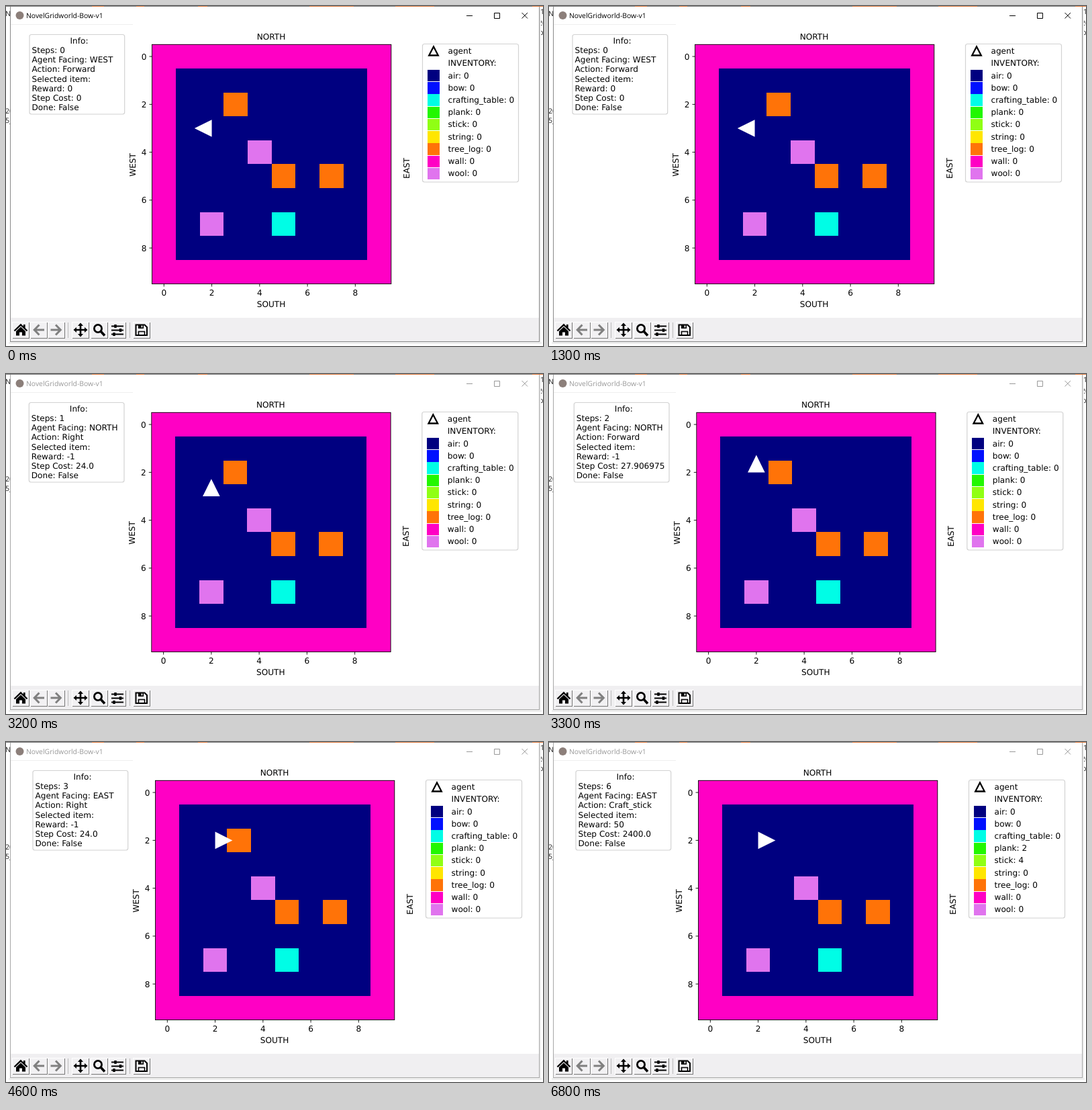
These frames come from a looping animation (800 by 506 pixels, 8 s). An HTML page:

```html
<!DOCTYPE html>
<html lang="en">
<head>
<meta charset="utf-8">
<title>NovelGridworld-Bow-v1</title>
<style>
  html, body { margin: 0; width: 100%; height: 100%; overflow: hidden; background: #fff; }
  svg { display: block; width: 800px; height: 506px; }
  text { font: 12.1px "DejaVu Sans", sans-serif; text-rendering: geometricPrecision; white-space: pre; }
  .mid { text-anchor: middle; }
  .end { text-anchor: end; }
  .title { font: 10.4px "Open Sans", sans-serif; }
  .behind text { font: 10.5px "Open Sans", sans-serif; fill: #222; }
  .crisp { shape-rendering: crispEdges; }
  .frame { fill: none; stroke: #8a8a8a; }
  .chrome { color: #000; }
  .blur .chrome { color: #999; }
  .blur .frame { stroke: #a8a8a8; }
  .box { fill: #fff; stroke: #d2d2d2; stroke-width: 1.2; }
</style>
</head>
<body>
<svg id="stage" viewBox="0 0 800 506">
  <rect width="800" height="506" fill="#fff"/>
  <g class="behind">
    <text x="-1" y="15">N</text><text x="-1" y="160">20</text><text x="-1" y="174">5_</text>
    <text x="796" y="12">1</text><text x="793" y="29">20</text><text x="794" y="43">p</text>
  </g>
  <rect x="4" y="500" width="794" height="3" fill="#eee"/>
  <rect x="795" y="4" width="2" height="496" fill="#eee"/>
  <rect class="frame crisp" x="6.5" y=".5" width="788" height="499" style="fill:#fff"/>
  <path d="M0 .5H800" stroke="#777"/>
  <path d="M128 .5h18M194 .5h12M286 .5h14M452 .5h66M580 .5h58M784 .5h16" stroke="#d9763a"/>
  <path class="crisp" d="M7 27.5H189" stroke="#eee"/>

  <circle cx="20.5" cy="14" r="6" fill="#8c7f7a"/>
  <g class="chrome">
    <text class="title" x="30" y="17.5" fill="currentColor">NovelGridworld-Bow-v1</text>
    <path d="M686 14.5H695M727.5 10.5h8v8h-8zM768.5 10l8.5 8.5M777 10l-8.5 8.5" fill="none" stroke="currentColor"/>
  </g>

  <g id="figure"></g>

  <rect class="crisp" x="7" y="464" width="787" height="35" fill="#f0eff1"/>
  <g id="buttons" class="crisp"></g>
  <path class="crisp" d="M92.5 471V494M184.5 471V494" stroke="#bbb"/>
  <g stroke-linecap="butt" fill="none" stroke="#000">
    <path d="M12.5 483.5L22 474.5l9.5 9" stroke-width="2.4"/>
    <path d="M15 484l7-6.5 7 6.5v6.5h-5v-5h-4v5h-5zM26 474h2.6v5H26z" fill="#000" stroke="none"/>
    <g id="arrow" stroke="#808080" stroke-width="3"><path d="M49.5 474.5l-7.3 7.5 7.3 7.5M43 482H57"/></g>
    <use href="#arrow" transform="matrix(-1 0 0 1 123.5 0)"/>
    <path d="M111 475V489M104 482H118" stroke-width="2.6"/>
    <path d="M111 471.5l4 4.5h-8zM111 492.5l4-4.5h-8zM100.5 482l4.5-4v8zM121.5 482l-4.5-4v8z" fill="#000" stroke="none"/>
    <circle cx="137" cy="480" r="5.6" stroke-width="2.8"/>
    <path d="M141 484l6 6.5" stroke-width="3.6"/>
    <path d="M157 476.5H175M157 482.5H175M157 488.5H175" stroke-width="1.8"/>
    <path d="M163 474v5M170.500 480v5M161 486v5" stroke-width="3.4"/>
    <path d="M193.500 474.500h13l3.500 3.500v12h-16.500z" stroke-width="2"/>
    <path d="M197.500 490v-5.500h9v5.500" stroke-width="1.6"/>
    <path d="M197 474h8v6h-8z" fill="#000" stroke="none"/>
    <path d="M202.500 475.500v3" stroke="#fff" stroke-width="1.800"/>
  </g>
</svg>
<script>
const LOOP = 8000, BLUR_AT = 2400;
const CELL = 35.63, LEFT = 217.5, TOP = 57.3;

const COLORS = {
  air: '#000080', bow: '#0010ff', crafting_table: '#00fde6', plank: '#22f700', stick: '#90ff14',
  string: '#ffe600', tree_log: '#ff7308', wall: '#ff00c4', wool: '#e074ee'
};
const ITEMS = [['tree_log', 3, 2], ['wool', 4, 4], ['tree_log', 5, 5], ['tree_log', 7, 5],
               ['wool', 2, 7], ['crafting_table', 5, 7]];
const TURN = { NORTH: 0, EAST: 90, WEST: -90 };

// dx is the shift of the whole figure after each redraw
const STEPS = [
  { at: 0,    dx: 0,   row: 3, face: 'WEST',  action: 'Forward',     reward: 0,  cost: '0' },
  { at: 2500, dx: -.7, row: 3, face: 'NORTH', action: 'Right',       reward: -1, cost: '24.0' },
  { at: 3300, dx: 2.3, row: 2, face: 'NORTH', action: 'Forward',     reward: -1, cost: '27.906975' },
  { at: 4100, dx: 5,   row: 2, face: 'EAST',  action: 'Right',       reward: -1, cost: '24.0' },
  { at: 4900, dx: 5,   row: 2, face: 'EAST',  action: 'Break',       reward: 10, cost: '3600.0', have: { tree_log: 1 } },
  { at: 5900, dx: 5,   row: 2, face: 'EAST',  action: 'Craft_plank', reward: 50, cost: '1200.0', have: { plank: 4 } },
  { at: 6700, dx: 5,   row: 2, face: 'EAST',  action: 'Craft_stick', reward: 50, cost: '2400.0', have: { plank: 2, stick: 4 } }
];
const BREAK_STEP = 4;

const stage = document.getElementById('stage');
const figure = document.getElementById('figure');

const rect = (x, y, w, h, fill) =>
  `<rect class="crisp" x="${x}" y="${y}" width="${w}" height="${h}" fill="${fill}"/>`;
const text = (x, y, s, cls = '') => `<text x="${x}" y="${y}" class="${cls}">${s}</text>`;
const upright = (x, y, s) =>
  `<text class="mid" transform="translate(${x} ${y}) rotate(-90)">${s}</text>`;
const colX = c => LEFT + CELL * c;
const rowY = r => TOP + CELL * r;

function info(s, n) {
  const lines = [`Steps: ${n}`, `Agent Facing: ${s.face}`, `Action: ${s.action}`, 'Selected item:',
                 `Reward: ${s.reward}`, `Step Cost: ${s.cost}`, 'Done: False'];
  return '<rect class="box" x="35" y="42.5" width="141.700" height="118.500" rx="3"/>' +
    text(109, 56, 'Info:', 'mid') +
    lines.map((line, i) => text(38.5, 70.2 + 14.13 * i, line)).join('');
}

function grid(s, n) {
  const items = n < BREAK_STEP ? ITEMS : ITEMS.slice(1);
  let out = rect(LEFT, TOP, CELL * 10, CELL * 10, COLORS.wall) +
    rect(colX(1), rowY(1), CELL * 8, CELL * 8, COLORS.air);
  for (const [name, c, r] of items) out += rect(colX(c), rowY(r), CELL, CELL, COLORS[name]);
  out += `<rect x="${LEFT}" y="${TOP}" width="${CELL * 10}" height="${CELL * 10}" fill="none" stroke="#000" stroke-width=".9"/>`;
  for (let k = 0; k < 10; k += 2) {
    const x = colX(k + .5), y = rowY(k + .5);
    out += `<path d="M${x} ${rowY(10)}v4M${LEFT} ${y}h-4" stroke="#000" stroke-width=".9"/>` +
      text(x, 431, k, 'mid') + text(209.5, y + 4.5, k, 'end');
  }
  out += text(395, 49.7, 'NORTH', 'mid') + text(395, 448, 'SOUTH', 'mid') +
    upright(192.5, 236.5, 'WEST') + upright(601, 241.5, 'EAST');
  return out + `<path d="M-12.8 0H12.8L0-25.800z" fill="#fff" transform="translate(${colX(2.5)} ${rowY(s.row + .5)}) rotate(${TURN[s.face]})"/>`;
}

function legend(s) {
  const have = s.have || {};
  let out = '<rect class="box" x="620.500" y="56.500" width="143" height="205.500" rx="3"/>' +
    '<path d="M637 60.500l6.800 13h-13.600z" fill="#fff" stroke="#000" stroke-width="2.300"/>' +
    text(658.5, 71, 'agent') + text(658.5, 89.3, 'INVENTORY:');
  Object.keys(COLORS).forEach((name, i) => {
    const y = 103.6 + 18.22 * i;
    out += rect(628, y - 8.6, 18, 17.4, COLORS[name]) +
      text(658.5, y + 4, `${name}: ${have[name] || 0}`);
  });
  return out;
}

document.getElementById('buttons').innerHTML = [9, 36, 62, 98, 126, 153, 189].map(x =>
  rect(x, 470, 26, 25, '#fff') + rect(x + 1, 471, 25, 24, '#777') + rect(x + 1, 471, 24, 23, '#f2f1f3')
).join('');

let shown = -1;
function draw(t) {
  stage.classList.toggle('blur', t >= BLUR_AT);
  const n = STEPS.filter(s => s.at <= t).length - 1;
  if (n === shown) return;
  shown = n;
  const s = STEPS[n];
  figure.setAttribute('transform', `translate(${s.dx} 0)`);
  figure.innerHTML = info(s, n) + grid(s, n) + legend(s);
}

const start = performance.now();
function tick() {
  draw((performance.now() - start) % LOOP);
  requestAnimationFrame(tick);
}
tick();
</script>
</body>
</html>
```
